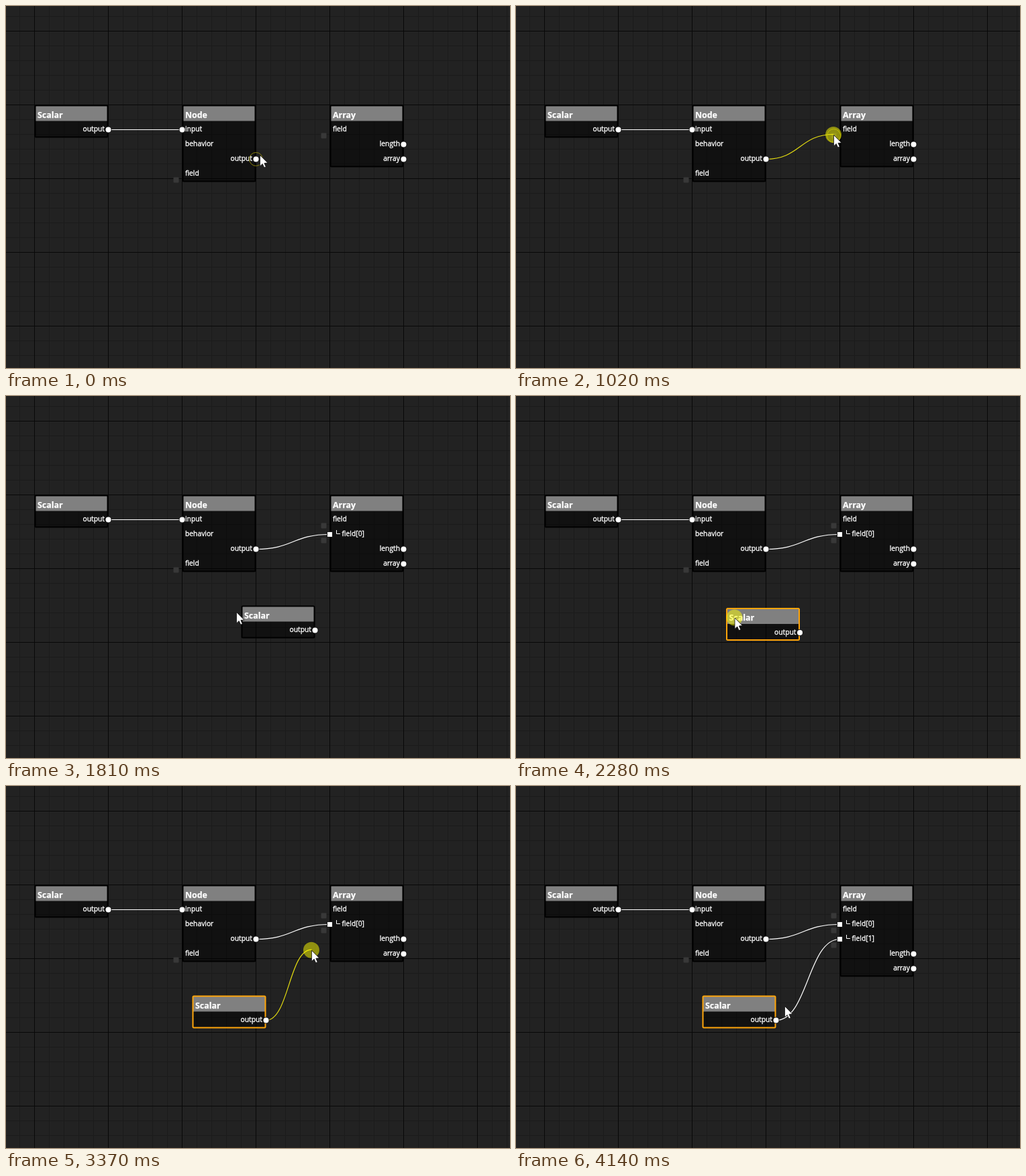
Animation of 751 by 540 pixels, one loop 4210 ms. Source, as an HTML page with a canvas:

```html
<!DOCTYPE html>
<html lang="en">
<head>
<meta charset="utf-8">
<title>Node editor</title>
<style>
html, body { margin: 0; width: 100%; height: 100%; overflow: hidden; background: #222; }
canvas { display: block; }
</style>
</head>
<body>
<canvas id="stage" width="751" height="540"></canvas>
<script>
const ctx = document.getElementById('stage').getContext('2d');
const W = 751, H = 540, LOOP = 4210, TICK = 78;
const NODE_W = 110, ROW = 22;
const FONT = '"Open Sans", "Noto Sans", sans-serif';
const WHITE = '#fff', DRAG = '#e4dc10';

// Moments of the story; pointer times are in ticks, results in ms
const PRESS_OUT = 3, GRAB = 26, DROP = 33, PRESS_EXTRA = 41;
const FIRST_LINK = 1190, SPAWN = 1580, SECOND_LINK = 3920;
const GRAB_POINT = { x: 363, y: 327 };

// The pointer glides from place to place, slowing down at each
const begin = { x: 378, y: 222 };
const move = (from, to, x, y) => ({ from, to, x, y });
const moves = [
  move(0, PRESS_OUT, 373, 225),
  move(PRESS_OUT, 11, 473, 192),
  move(16, 20, 343, 322),
  move(24, GRAB, GRAB_POINT.x, GRAB_POINT.y),
  move(GRAB, 29, 325.5, 330.5),
  move(29, 31, 275, 328),
  move(31, DROP, 290, 327),
  move(DROP, 38.5, 390, 344),
  move(PRESS_EXTRA, 45, 473, 217),
  move(50, 53, 400, 328)
];

const clamp = v => Math.min(1, Math.max(0, v));
const easeOut = u => 1 - (1 - u) ** 2.2;

function pointerAt(k) {
  let { x, y } = begin;
  for (const m of moves) {
    const f = easeOut(clamp((k - m.from) / (m.to - m.from)));
    x += (m.x - x) * f;
    y += (m.y - y) * f;
  }
  return { x, y };
}

function drawGrid() {
  ctx.fillStyle = '#222';
  ctx.fillRect(0, 0, W, H);
  const lines = (step, color) => {
    ctx.fillStyle = color;
    for (let x = 42 % step; x < W; x += step) ctx.fillRect(x, 0, 1, H);
    for (let y = 37 % step; y < H; y += step) ctx.fillRect(0, y, W, 1);
  };
  lines(22, '#1b1b1b');
  lines(110, '#080808');
}

const portX = (node, row) => node.x + (row.out ? NODE_W : 0);
const portY = (node, i) => node.y + 37 + ROW * i;

function drawText(text, x, y, font, align, weight) {
  ctx.font = font + ' ' + FONT;
  ctx.textAlign = align;
  ctx.fillStyle = ctx.strokeStyle = WHITE;
  ctx.lineWidth = weight;
  ctx.fillText(text, x, y);
  ctx.strokeText(text, x, y);
}

function drawFrame(node) {
  const h = 27 + ROW * node.rows.length;
  ctx.save();
  ctx.translate(node.x + 0.5, node.y + 0.5);
  ctx.fillStyle = 'rgba(0,0,0,.5)';
  ctx.fillRect(1, 1, NODE_W - 2, h - 2);
  ctx.fillStyle = '#808080';
  ctx.fillRect(1, 1, NODE_W - 2, 23);
  ctx.strokeStyle = node.selected ? '#ffa50a' : '#000';
  ctx.lineWidth = 2;
  ctx.beginPath();
  ctx.roundRect(1, 1, NODE_W - 2, h - 2, 1.5);
  ctx.stroke();
  ctx.restore();
}

function drawNode(node) {
  const { x, y } = node;
  drawFrame(node);
  drawText(node.title, x + 5, y + 19.5, 'bold 12.4px', 'left', 0.25);
  node.rows.forEach((row, i) => {
    const py = portY(node, i);
    const inset = row.out ? 105 : row.item ? 18.5 : 5;
    drawText(row.label, x + inset, py + 3, '10.3px', row.out ? 'right' : 'left', 0.35);
    if (row.item) {
      ctx.lineWidth = 1;
      ctx.beginPath();
      ctx.moveTo(x + 10.5, py - 6);
      ctx.lineTo(x + 10.5, py - 0.5);
      ctx.lineTo(x + 16, py - 0.5);
      ctx.stroke();
    }
    if (row.grip) {
      ctx.fillStyle = '#383838';
      ctx.beginPath();
      ctx.roundRect(x - 12.5, py + 5.5, 8, 8, 1);
      ctx.fill();
    }
  });
}

function drawPorts(node) {
  node.rows.forEach((row, i) => {
    if (!row.out && !row.port && !row.item) return;
    const px = portX(node, row) + 0.5, py = portY(node, i) + 0.5;
    ctx.beginPath();
    if (row.item) ctx.rect(px - 3.5, py - 3.5, 7, 7);
    else ctx.arc(px, py, 4, 0, 7);
    ctx.strokeStyle = '#181818';
    ctx.lineWidth = 2;
    ctx.stroke();
    ctx.fillStyle = WHITE;
    ctx.fill();
  });
}

function drawWire(x0, y0, x1, y1, color) {
  const mid = (x0 + x1) / 2;
  ctx.strokeStyle = color;
  ctx.lineWidth = 1.2;
  ctx.beginPath();
  ctx.moveTo(x0 + 0.5, y0 + 0.5);
  ctx.bezierCurveTo(mid + 0.5, y0 + 0.5, mid + 0.5, y1 + 0.5, x1 + 0.5, y1 + 0.5);
  ctx.stroke();
}

// Outputs and grips light up when the pointer is near
function drawHover(node, pointer) {
  node.rows.forEach((row, i) => {
    if (!row.out && !row.grip) return;
    const x = row.out ? portX(node, row) : node.x - 9;
    const y = portY(node, i) + (row.out ? 0 : 9);
    if (Math.hypot(pointer.x - x, pointer.y - y) > 12) return;
    ctx.strokeStyle = '#8a820c';
    ctx.lineWidth = 1;
    ctx.beginPath();
    ctx.arc(x + 0.5, y + 0.5, 10, 0, 7);
    ctx.stroke();
  });
}

const arrow = new Path2D('M0 0V16.4L3.7 13L6.2 18.6L8.8 17.5L6.4 12L11.4 11.6Z');

function drawPointer({ x, y }, pressed) {
  if (pressed) {
    ctx.fillStyle = 'rgba(255,255,0,.5)';
    ctx.beginPath();
    ctx.arc(x, y, 12, 0, 7);
    ctx.fill();
  }
  ctx.save();
  ctx.translate(x + 0.5, y + 0.5);
  ctx.fillStyle = WHITE;
  ctx.fill(arrow);
  ctx.strokeStyle = '#111';
  ctx.lineWidth = 0.8;
  ctx.stroke(arrow);
  ctx.restore();
}

const out = label => ({ label, out: true });
const field = { label: 'field', grip: true };
const item = i => ({ label: `field[${i}]`, item: true, grip: true });
const node = (title, x, y, ...rows) => ({ title, x, y, rows });

function draw(t) {
  const k = Math.floor((t + 1) / TICK);
  const pointer = pointerAt(k);
  const links = (t >= FIRST_LINK) + (t >= SECOND_LINK);
  const items = Array.from({ length: links }, (_, i) => item(i));

  const nodes = [
    node('Scalar', 42, 147, out('output')),
    node('Node', 262, 147, { label: 'input', port: true }, { label: 'behavior' }, out('output'), field),
    node('Array', 482, 147, field, ...items, out('length'), out('array'))
  ];
  const extra = node('Scalar', 350, 312, out('output'));
  if (k >= GRAB) {
    const hand = pointerAt(Math.min(k, DROP));
    extra.x += hand.x - GRAB_POINT.x;
    extra.y += hand.y - GRAB_POINT.y;
    extra.selected = true;
  }
  if (t >= SPAWN) nodes.push(extra);

  drawGrid();
  nodes.forEach(drawNode);

  const ex = extra.x + NODE_W, ey = portY(extra, 0);
  drawWire(152, 184, 262, 184, WHITE);
  if (links > 0) drawWire(372, 228, 482, 206, WHITE);
  else if (k >= PRESS_OUT) drawWire(372, 228, pointer.x, pointer.y - 1, DRAG);
  if (links > 1) drawWire(ex, ey, 482, 228, WHITE);
  else if (k > PRESS_EXTRA) drawWire(ex, ey, pointer.x, pointer.y - 1, DRAG);

  nodes.forEach(drawPorts);
  nodes.forEach(n => drawHover(n, pointer));

  const pressed = k >= PRESS_OUT && t < FIRST_LINK
    || k >= GRAB && k < DROP
    || k >= PRESS_EXTRA && t < SECOND_LINK;
  drawPointer(pointer, pressed);
}

const start = performance.now();
function loop() {
  draw((performance.now() - start) % LOOP);
  requestAnimationFrame(loop);
}
loop();
</script>
</body>
</html>
```
